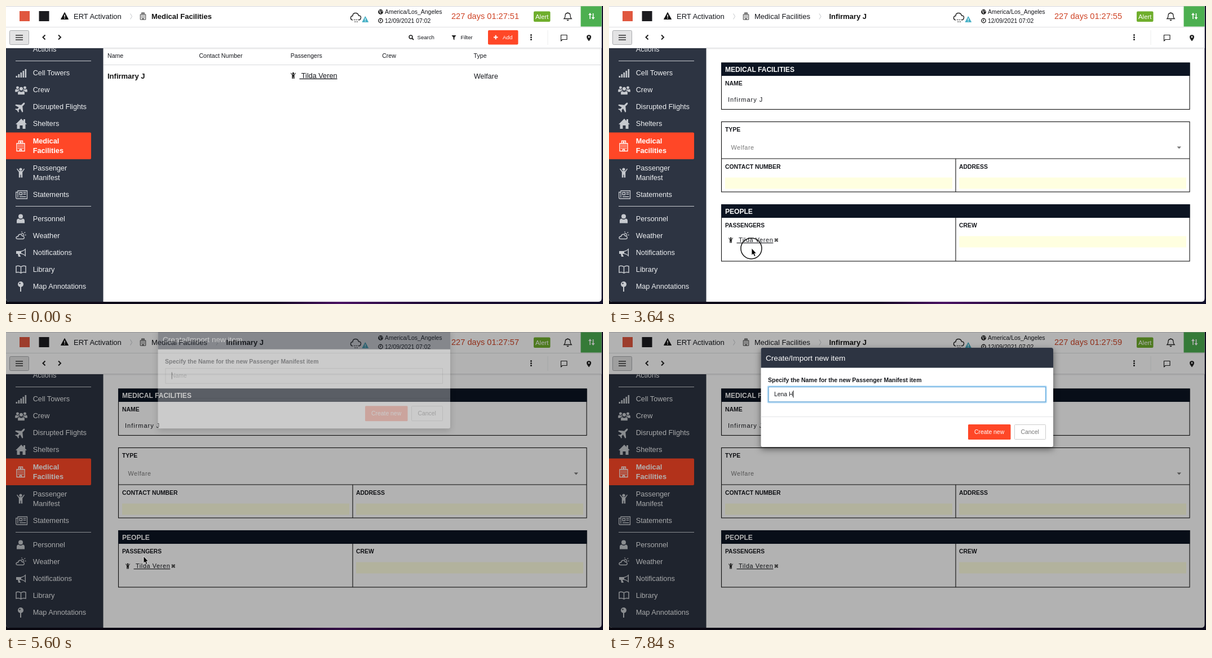
These frames come from a looping animation (1059x529 px, 8 s). An HTML page:

```html
<!DOCTYPE html>
<html lang="en">
<head>
<meta charset="utf-8">
<title>Incident dashboard</title>
<style>
  html, body { margin: 0; width: 100%; height: 100%; overflow: hidden; background: #fff; }
  svg { display: block; width: 100%; height: 100%; }
  text { font-family: "Liberation Sans", Arial, sans-serif; white-space: pre; }
  #modal { filter: drop-shadow(0 4px 6px rgba(0,0,0,.5)); }
  #menu { filter: drop-shadow(0 3px 4px rgba(0,0,0,.3)); }
</style>
</head>
<body>
<svg id="stage" viewBox="0 0 1059 529" xmlns="http://www.w3.org/2000/svg"></svg>
<script>
const DURATION = 8000, STEP = 70, RIGHT = 1056.5;
const ORANGE = '#ff4727', NAVY = '#2d3442', INK = '#15171c', BAR = '#0c1422', PALE = '#c6c9ce';

// Text is placed by the middle of its capitals.
const text = (x, cy, s, size, fill = INK, extra = '') =>
  `<text x="${x}" y="${(cy + size * .335).toFixed(2)}" font-size="${size}" fill="${fill}" ${extra}>${s}</text>`;
const bold = (x, cy, s, size, fill = INK) => text(x, cy, s, size, fill, 'font-weight="700"');
const rect = (x, y, w, h, fill, extra = '') =>
  `<rect x="${x}" y="${y}" width="${w}" height="${h}" fill="${fill}" ${extra}/>`;
const fillPath = (d, fill, extra = '') => `<path d="${d}" fill="${fill}" ${extra}/>`;
const line = (d, color, w = 1, extra = '') =>
  `<path d="${d}" fill="none" stroke="${color}" stroke-width="${w}" ${extra}/>`;
const dot = (x, y, r, fill) => `<circle cx="${x}" cy="${y}" r="${r}" fill="${fill}"/>`;
const ring = (x, y, r, color, w) => `<circle cx="${x}" cy="${y}" r="${r}" fill="none" stroke="${color}" stroke-width="${w}"/>`;
const group = (id, body) => `<g id="${id}">${body}</g>`;
const at = (x, y, body, scale = 1, angle = 0) =>
  `<g transform="translate(${x} ${y}) rotate(${angle}) scale(${scale})">${body}</g>`;

// Icons are drawn around their own centre.
const icon = {
  child: c => dot(0, -6, 2.6, c) +
    fillPath('M-6-7.5 L-2.5-3 H2.5 L6-7.5 7-6.5 3.2-1 V8.5 H.6 V3.5 H-.6 V8.5 H-3.2 V-1 L-7-6.5Z', c),
  building: c => line('M-7 9 V-4.5 H7 V9Z M-3.5-4.5 V-9 H3.5 V-4.5 M-1.5 9 V6 H1.5 V9 M0-8 V-5 M-1.5-6.5 H1.5', c, 1.3) +
    line('M-4.8-1.5 H5 M-4.8 1.5 H5 M-4.8 4.500 H5', c, 1.5, 'stroke-dasharray="1.5 1.2"'),
  person: c => dot(0, -4, 4, c) + fillPath('M-7 8 V4 Q-7 0-3.5 0 Q0 3 3.5 0 Q7 0 7 4 V8Z', c),
  people: c => at(-6.5, -1.5, icon.person(c), .62) + at(6.5, -1.5, icon.person(c), .62) +
    at(0, 1.5, `<g stroke="${NAVY}" stroke-width="1.2">${icon.person(c)}</g>`, .92),
  signal: c => [0, 1, 2, 3, 4].map(i => rect(-9 + i * 4, 5 - i * 3, 2.6, 3 + i * 3, c)).join(''),
  plane: c => fillPath('M0-10 Q1.6-10 1.6-6 V-3 L9 3 V5 L1.6 3 V6.5 L4 8.5 V10 L0 9-4 10 V8.5 L-1.6 6.5 V3 L-9 5 V3 L-1.6-3 V-6 Q-1.6-10 0-10Z', c),
  house: c => fillPath('M-10 1 L0-9 4-5 V-8 H7 V-2 L10 1 H7.5 V9 H2.5 V3 H-2.5 V9 H-7.5 V1Z', c),
  paper: c => line('M-6.5-7 H10 V7 H-8 Q-9.8 7-9.8 5 V-4.5 H-6.5Z M-6.5-4.5 V5 M-3.5-4 H1 V0 H-3.5Z M3-4 H8 M3-1 H8 M-3.5 3.5 H8', c, 1.3),
  weather: c => line('M-5 6 H4 Q7 5.5 6 2.5 Q5 .5 3 1 Q1.5-3-2-2 Q-4.5-1-4.5 1.5 Q-8 1.5-8 4 Q-8 6-5 6Z', c, 1.4) +
    line('M1-3.5 Q3.5-5 5-2.5 Q6-.5 5 .8 M2-6 V-7.5 M6.5-4.5 L8-6 M7.5-1 H9.5', c, 1.3),
  horn: c => fillPath('M-9-3 H-1 Q5-4 8-8 V7 Q5 3-1 2 H-3 L-1 7 H-5 L-6 2 H-9Z', c) +
    fillPath('M0-1.7 Q4-2.5 6.5-5 V4 Q4 1.5 0 .8Z', NAVY),
  book: c => line('M0-4.5 Q-4-7.5-8.5-5.5 V5.5 Q-4 4 0 6.5 Q4 4 8.5 5.5 V-5.5 Q4-7.5 0-4.5 V6.5', c, 1.5),
  pin: c => dot(0, -4, 5, c) + rect(-1, 0, 2, 9, c) + dot(-1.5, -5.5, 1.2, NAVY),
  warning: (c, mark) => fillPath('M0-6 L6.5 6 H-6.5Z', c, `stroke="${c}" stroke-linejoin="round"`) +
    rect(-.8, -2, 1.6, 4, mark) + rect(-.8, 3.2, 1.6, 1.6, mark),
  cross: c => line('M-2.7-2.7 L2.7 2.7 M2.7-2.7 L-2.7 2.7', c, 2.4),
};

function sidebar() {
  const items = [
    [119, 'Cell Towers', 'signal', 26.5], [149, 'Crew', 'people', 27], [179, 'Disrupted Flights', 'plane', 26, 45],
    [209, 'Shelters', 'house', 27], [335, 'Statements', 'paper', 27.5], [377.5, 'Personnel', 'person', 26],
    [407.5, 'Weather', 'weather', 26], [438, 'Notifications', 'horn', 27], [467.5, 'Library', 'book', 26.5],
    [498, 'Map Annotations', 'pin', 26],
  ];
  const label = (cy, s) => text(47.7, cy, s, 12.7, '#eef0f2');
  return fillPath('M0 70 H172.5 V525 H6 Q0 525 0 519Z', NAVY) + label(76.5, 'Actions') +
    line('M17 97.5 H151 M17 355.5 H151', PALE, 1.2) +
    items.map(([y, s, name, x, angle]) => at(x, y, icon[name](PALE), 1, angle) + label(y, s)).join('') +
    fillPath('M0 224.5 H149 Q151 224.5 151 226.5 V270 Q151 272 149 272 H0Z', ORANGE) +
    at(26, 248.5, icon.building('#fff')) +
    bold(47.7, 240, 'Medical', 12.7, '#fff') + bold(47.7, 257, 'Facilities', 12.7, '#fff') +
    at(26, 296, icon.child(PALE)) + label(287.5, 'Passenger') + label(304.5, 'Manifest');
}

function header() {
  const chevron = x => line(`M${x} 13.5 l3 5 -3 5`, '#c3c6ca', 1);
  return rect(0, 0, RIGHT, 74.5, '#fff') +
    line(`M0 37.5 H${RIGHT}`, '#dedfe1') + line(`M0 .5 H${RIGHT}`, '#d5d5d8') +
    rect(0, 74, RIGHT, 1, '#dcdde0') + rect(0, 75, RIGHT, 2, 'rgba(0,0,0,.05)') +
    rect(24, 9, 18, 18, '#e0573f') + rect(58.5, 9, 18, 18, '#1b1b1f') +
    at(104, 17.5, icon.warning('#111', '#fff')) + text(120, 18.5, 'ERT Activation', 13) + chevron(220.5) +
    at(243, 18, icon.building('#222'), .68) +
    group('crumbList', bold(258, 18.5, 'Medical Facilities', 13, '#111')) +
    group('crumbItem', text(258, 18.5, 'Medical Facilities', 13) + chevron(373) + bold(390.5, 18.5, 'Infirmary J', 13, '#111')) +
    line('M615 25 Q611 24 611.5 20.5 Q612 17.5 615 17.5 Q615 12.5 620 12.5 Q624.5 12.5 625.5 17 Q630 17 629.5 21 Q629 24.5 626 25', '#222', 1.4) +
    line('M617 24.5 H626 M618.5 28 H624', '#222', 1.6, 'stroke-dasharray="1.6 1.8"') +
    at(637.3, 23.5, icon.warning('#45b0c6', '#fff'), .82) +
    dot(664.5, 10.5, 4.4, '#222') + line('M662 8 l2 1 -1 2 2 2 M666 8 l1.5 2', '#fff', 1.1) +
    ring(664.5, 26, 3.7, '#222', 1.4) + line('M664.5 23.5 V26.5 H662.8', '#222', 1.1) +
    text(672, 10.5, 'America/Los_Angeles', 10.45) + text(672, 26, '12/09/2021 07:02', 10.45) +
    text(790, 18.5, '', 14.6, '#cf4426', 'id="clock"') +
    rect(936, 9.5, 29.5, 18.5, '#6fae2c', 'rx="2"') + text(939, 19.5, 'Alert', 11.4, '#fff') +
    line('M990 22.5 Q992 20.5 992 17 Q992 12.5 996.5 12.5 Q1001 12.5 1001 17 Q1001 20.5 1003 22.5Z M995 24.5 Q996.5 26.5 998 24.5 M996.5 11 V12.5', '#222', 1.3) +
    rect(1019.5, .5, RIGHT - 1019.5, 36, '#4caf50') +
    fillPath('M1036 12 l3 4 h-2.2 v7 h-1.6 v-7 h-2.2z M1041.5 24 l-3-4 h2.2 v-7 h1.6 v7 h2.2z', '#fff') +
    rect(6.5, 43.5, 34, 25, '#e3e3e4', 'rx="2" stroke="#a9abae"') + line('M17 52 H30 M17 56 H30 M17 60 H30', '#333', 1.3) +
    line('M69.5 51.5 l-4 4 4 4 M93 51.5 l4 4 -4 4', '#222', 2) +
    group('tools',
      ring(718, 55, 2.9, '#222', 1.5) + line('M720 57 l3 3', '#222', 1.8) +
      text(729.5, 56, 'Search', 9.6) + fillPath('M790.5 52 h8 l-3 4 v4.5 l-2-1.5 v-3z', '#222') + text(806.5, 56, 'Filter', 9.6) +
      rect(855, 43, 53.5, 25.5, ORANGE, 'rx="2"') + line('M865 55.5 h7.5 M868.7 51.8 v7.5', '#fff', 2) + text(881, 56, 'Add', 9.9, '#fff')) +
    [51.5, 55.5, 59.5].map(y => dot(931.5, y, 1.5, '#222')).join('') + line('M961 43 V69', '#eceded') +
    line('M984.5 51.5 H995 V59.5 H987 L984.5 62Z', '#222', 1.2, 'stroke-linejoin="round"') +
    fillPath('M1034 62.5 Q1030 57.5 1030 55 Q1030 51.3 1034 51.3 Q1038 51.3 1038 55 Q1038 57.5 1034 62.5Z', '#222') + dot(1034, 55, 1.4, '#fff');
}

function table() {
  const heads = ['Name', 'Contact Number', 'Passengers', 'Crew', 'Type'];
  return heads.map((s, i) => text(180 + i * 162.4, 88.5, s, 10.6)).join('') + line(`M173 104.5 H${RIGHT}`, '#d9dadc') +
    bold(180, 125, 'Infirmary J', 13, '#111') + at(509.5, 123.5, icon.child('#222'), .66) +
    text(520.5, 123.5, ' Tilda Veren', 12.7, INK, 'text-decoration="underline"') + text(830, 125, 'Welfare', 12.5);
}

function form() {
  const frame = (y, h) => rect(199.5, y, 830.5, h, '#fff', 'stroke="#111" stroke-width="1.1"');
  const yellow = (x, y) => rect(x, y, 403, 20, '#ffffe0');
  return frame(101, 82.5) + rect(199, 100.5, 831.5, 23.5, BAR) + bold(206, 113, 'MEDICAL FACILITIES', 12.05, '#fff') +
    bold(206, 138, 'NAME', 10.4) + frame(205.5, 124.5) + line('M199.5 271 H1030 M615 271 V330', '#111', 1.1) +
    bold(206, 219.5, 'TYPE', 10.4) + bold(206, 285.5, 'CONTACT NUMBER', 10.4) + bold(621, 285.5, 'ADDRESS', 10.4) +
    frame(352.5, 100.5) + line('M615 376 V453', '#111', 1.1) + rect(199, 352, 831.5, 24, BAR) +
    bold(206, 364.5, 'PEOPLE', 12.05, '#fff') + bold(206, 389.5, 'PASSENGERS', 10.2) + bold(621, 389.5, 'CREW', 10.4) +
    group('values',
      text(211, 166.5, 'Infirmary J', 11, INK, 'letter-spacing="1"') + text(216.5, 251, 'Welfare', 10.8, '#777', 'letter-spacing=".6"') +
      fillPath('M1007.5 249.5 h7.5 l-3.75 4z', '#777') + yellow(206, 304.5) + yellow(621, 304.5) + yellow(621, 408.5)) +
    group('token', at(216, 415.5, icon.child('#222'), .58) +
      text(226.5, 415.5, ' Tilda Veren', 10.8, INK, 'letter-spacing=".65" text-decoration="underline"') + at(296.8, 415.5, icon.cross('#555'))) +
    group('editor', rect(208, 408, 400, 42, '#fff', 'stroke="#e6e7e9"') + at(213.5, 419.5, icon.child('#222'), .58) +
      text(223, 419.5, ' Tilda Veren', 10.3, INK, 'text-decoration="underline"') + at(284, 419.5, icon.cross('#555')) +
      rect(211.2, 434.5, 1.1, 12, '#111', 'id="fieldCaret"') +
      group('menu', rect(208, 320, 400.5, 88, '#fff', 'stroke="#d0d1d3" stroke-width=".6"')) +
      rect(208, 324, 400.5, 20.5, '#3d8bcb') + rect(208, 344.5, 400.5, 20, '#f0f0f0', 'id="hoverSecond"') +
      rect(208, 383, 400.5, 20.5, '#f0f0f0', 'id="hoverAdd"') + line('M225 373.5 H592', '#e1e2e4') +
      text(225.5, 334, 'Lena Dax', 10.4, '#fff') + text(225.5, 354, 'Theo Varick', 10.4, '#333') + text(225.5, 393, 'Add...', 10.4, '#333'));
}

const modal = () =>
  rect(269.5, 28, 518.5, 176, '#fff', 'rx="3"') + fillPath('M269.5 63.5 V31 Q269.5 28 272.5 28 H785 Q788 28 788 31 V63.5Z', NAVY) +
  text(278, 46, 'Create/Import new item', 13.6, '#fff') + bold(282, 85.5, 'Specify the Name for the new Passenger Manifest item', 10.5) +
  rect(283, 97.5, 491.5, 26.5, '#fff', 'stroke="#ccc"') +
  group('focusRing', rect(281.5, 96, 494.5, 29.5, 'none', 'rx="2" stroke="#bfe0f7" stroke-width="2"') +
    rect(283, 97.5, 491.5, 26.5, 'none', 'stroke="#5aa5dc" stroke-width="1.2"')) +
  text(293, 110.5, 'Name', 10.4, '#999', 'id="hint"') + text(293, 110.5, '', 10.4, INK, 'id="typed"') +
  rect(294, 104, 1, 12.5, '#111', 'id="nameCaret"') + line('M269.5 150.5 H788', '#e3e4e6') +
  rect(637, 164, 75.5, 27, ORANGE, 'id="create" rx="1.5"') + text(648, 177.5, 'Create new', 10.4, '#fff') +
  rect(719.5, 164.5, 55, 26, '#fff', 'rx="1" stroke="#ccc"') + text(730.5, 177.5, 'Cancel', 10.4, '#777');

const pointer = () =>
  group('click', ring(-.6, -.6, 18.5, '#111', 1.5)) +
  group('arrow', fillPath('M0-1 V11.5 L2.7 9 L4.8 13.5 L7 12.5 L5 8.2 H8.5Z', '#000', 'stroke="#fff" stroke-width=".8"')) +
  group('hand', fillPath('M-1 0 Q0-1.5 1.2 0 V4.5 L3.5 5 L8.3 6.5 Q9.3 7 9 9 L7.5 13.5 H1 L-4 8 Q-4.5 6.5-3 6.5 L-1 8Z', '#fff', 'stroke="#111" stroke-width="1.1" stroke-linejoin="round"') +
    line('M3.5 5 V7.5 M6 5.8 V8', '#111', .8));

document.getElementById('stage').innerHTML =
  `<defs><linearGradient id="desk"><stop offset="0" stop-color="#0b0a14"/><stop offset=".45" stop-color="#160a24"/>
   <stop offset=".56" stop-color="#4b1464"/><stop offset=".72" stop-color="#1d0d33"/><stop offset="1" stop-color="#12102a"/></linearGradient></defs>` +
  rect(0, 0, 1059, 529, 'url(#desk)') + fillPath(`M0 0 H${RIGHT} V519 Q${RIGHT} 525 1050.5 525 H6 Q0 525 0 519Z`, '#fff') +
  sidebar() + group('table', table()) + group('form', form()) + header() +
  rect(0, 0, 1059, 529, '#000', 'id="shade"') + group('modal', modal()) + group('pointer', pointer());

const el = id => document.getElementById(id);
const show = (id, on) => el(id).setAttribute('display', on ? 'inline' : 'none');
const clamp = v => Math.max(0, Math.min(1, v));
const between = (t, a, b) => t >= a && t < b;

const path = [
  [70, 628, 520], [490, 423, 230], [700, 423, 230], [1260, 346, 118], [2450, 346, 118], [2520, 350, 132],
  [3010, 275, 460], [3290, 257, 432], [3430, 253, 431], [4200, 253, 431], [4620, 248, 356],
  [4760, 247, 362], [4970, 243, 399], [5390, 244, 399],
];
function pointerAt(t) {
  const i = path.findIndex(p => p[0] > t);
  if (i < 0) return path[path.length - 1].slice(1);
  if (i === 0) return path[0].slice(1);
  const [t0, x0, y0] = path[i - 1], [t1, x1, y1] = path[i];
  const p = (t - t0) / (t1 - t0), e = p * p * (3 - 2 * p);
  return [x0 + (x1 - x0) * e, y0 + (y1 - y0) * e];
}

const keyTimes = [6650, 6860, 7000, 7210, 7420, 7840];
function render(t) {
  const seconds = 51 + Math.max(0, Math.floor((t - 140) / 1060) + 1);
  el('clock').textContent = '227 days 01:27:' + seconds;

  const onItem = t >= 1960;
  show('crumbList', !onItem);
  show('crumbItem', onItem);
  show('tools', t < 1750);
  show('table', t < 1750);
  show('form', t >= 1820);
  show('values', onItem);

  const editing = between(t, 3710, 5390);
  show('editor', editing);
  show('token', t >= 2030 && !editing);
  show('fieldCaret', Math.floor((t - 3710) / 512) % 2 === 0);
  show('hoverSecond', between(t, 4480, 4830));
  show('hoverAdd', t >= 4900);

  el('shade').setAttribute('opacity', .3 * clamp((t - 5420) / 150));
  const left = 1 - clamp((t - 5500) / 450);
  show('modal', t >= 5530);
  el('modal').setAttribute('opacity', clamp((t - 5530) / 210));
  el('modal').setAttribute('transform', `translate(0 ${-63 * left ** 2.6})`);
  show('focusRing', t >= 5670);

  const count = keyTimes.filter(k => t >= k).length;
  el('typed').textContent = 'Lena H'.slice(0, count);
  show('hint', !count);
  show('nameCaret', !between(t, 6090, 6650));
  el('nameCaret').setAttribute('x', count ? 293 + el('typed').getComputedTextLength() : 293.7);
  el('create').setAttribute('opacity', count ? 1 : .63);

  const [x, y] = pointerAt(t), hand = between(t, 4340, 5390);
  show('pointer', between(t, 70, 6650));
  el('pointer').setAttribute('transform', `translate(${x} ${y})`);
  show('hand', hand);
  show('arrow', !hand);
  show('click', between(t, 1680, 1750) || between(t, 3570, 3710) || between(t, 5390, 5460));
}

const start = performance.now();
function tick() {
  const t = (performance.now() - start) % DURATION;
  render(Math.floor(t / STEP) * STEP);
  requestAnimationFrame(tick);
}
tick();
</script>
</body>
</html>
```
